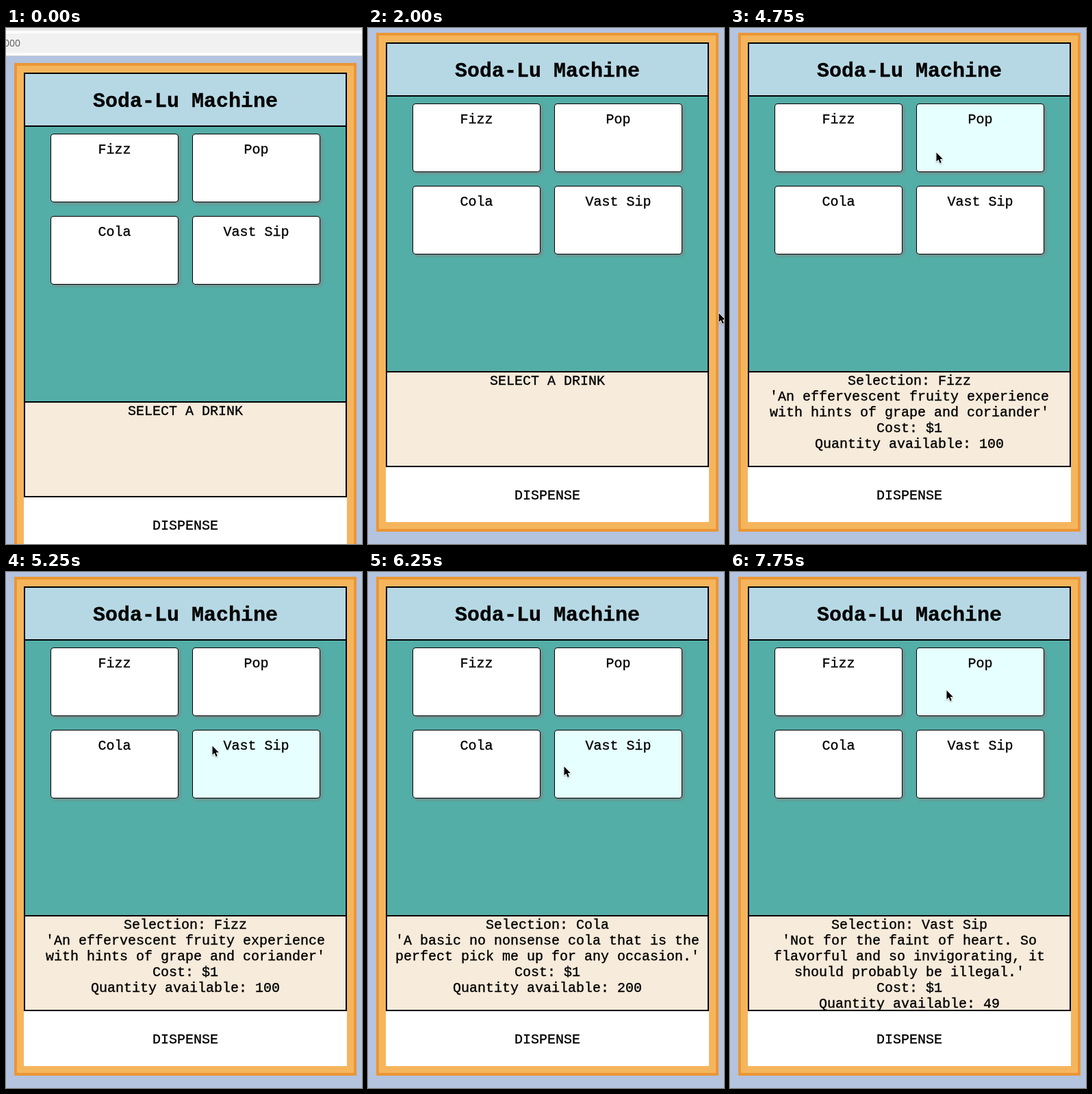
Animation, 520 px wide and 752 px high, one loop 8 s. Source, as an HTML page with a canvas:

```html
<!DOCTYPE html>
<html lang="en">
<head>
<meta charset="utf-8">
<title>Drink machine</title>
<style>
  html, body { margin: 0; width: 100%; height: 100%; overflow: hidden; background: #b4c3de; }
  canvas { display: block; }
</style>
</head>
<body>
<canvas id="stage" width="520" height="752"></canvas>
<script>
const ctx = document.getElementById('stage').getContext('2d');
const LOOP = 8000, STEP = 250, SCROLL = 44;
const CARD_W = 187, CARD_H = 100, GAP = 20;
const LINE_CHARS = 38, LINE_H = 23;
const MONO = '"Liberation Mono", monospace';

const drinks = [
  { name: 'Fizz', stock: 100,
    blurb: 'An effervescent fruity experience with hints of grape and coriander' },
  { name: 'Pop' },
  { name: 'Cola', stock: 200,
    blurb: 'A basic no nonsense cola that is the perfect pick me up for any occasion.' },
  { name: 'Vast Sip', stock: 49,
    blurb: 'Not for the faint of heart. So flavorful and so invigorating, it should probably be illegal.' }
];
drinks.forEach((drink, i) => {
  drink.x = 65 + (i % 2) * (CARD_W + GAP);
  drink.y = 110 + (i >> 1) * (CARD_H + GAP);
});

const clicks = [
  { time: 3750, drink: drinks[0] },
  { time: 5750, drink: drinks[2] },
  { time: 7250, drink: drinks[3] }
];

// Pointer key points: time, x, y
const path = [
  [2000, 512, 415], [2500, 373, 316], [3000, 196, 205], [3250, 195, 205],
  [3500, 192, 198], [3750, 187, 191], [4000, 193, 191], [4250, 214, 195],
  [4500, 215, 195], [4750, 301, 181], [5250, 301, 253], [5500, 226, 278],
  [6000, 226, 278], [6250, 286, 283], [7000, 301, 285], [7500, 314, 177],
  [7750, 316, 172]
];

function pointerAt(t) {
  if (t < path[0][0]) return null;
  const next = path.findIndex(key => key[0] > t);
  if (next < 0) return path.at(-1).slice(1);
  const [t0, x0, y0] = path[next - 1];
  const [t1, x1, y1] = path[next];
  const k = (t - t0) / (t1 - t0);
  return [x0 + (x1 - x0) * k, y0 + (y1 - y0) * k];
}

// The lowest few pixels of a card do not react
const isOver = ({ x, y }, [px, py]) =>
  px >= x && px < x + CARD_W && py >= y && py < y + CARD_H - 6;

function wrap(str) {
  const lines = [''];
  for (const word of str.split(' ')) {
    const joined = (lines.at(-1) + ' ' + word).trim();
    if (joined.length > LINE_CHARS) lines.push(word);
    else lines[lines.length - 1] = joined;
  }
  return lines;
}

function messageAt(t) {
  const click = clicks.findLast(c => c.time <= t);
  if (!click) return ['SELECT A DRINK'];
  const { name, blurb, stock } = click.drink;
  return [`Selection: ${name}`, ...wrap(`'${blurb}'`), 'Cost: $1', `Quantity available: ${stock}`];
}

function box(color, x, y, w, h) {
  ctx.fillStyle = color;
  ctx.fillRect(x, y, w, h);
}

function roundBox(color, x, y, w, h, r) {
  ctx.fillStyle = color;
  ctx.beginPath();
  ctx.roundRect(x, y, w, h, r);
  ctx.fill();
}

function text(str, x, y, font = '20px ' + MONO) {
  ctx.font = font;
  ctx.textAlign = 'center';
  ctx.fillStyle = ctx.strokeStyle = '#000';
  ctx.lineWidth = 0.35;
  ctx.fillText(str, x, y);
  ctx.strokeText(str, x, y);
}

function drawCard({ name, x, y }, hovered) {
  ctx.save();
  ctx.shadowColor = 'rgba(128, 128, 128, .9)';
  ctx.shadowBlur = 4;
  ctx.shadowOffsetX = ctx.shadowOffsetY = 2;
  roundBox('#000', x, y, CARD_W, CARD_H, 5);
  ctx.restore();
  roundBox(hovered ? '#e6ffff' : '#fff', x + 1, y + 1, CARD_W - 2, CARD_H - 2, 4);
  text(name, x + CARD_W / 2, y + 29);
}

function drawMachine(lines, pointer) {
  box('#eb9634', 12, 7, 500, 727);
  box('#f5b55d', 16, 11, 492, 719);
  box('#000', 26, 21, 472, 619);
  box('#b6d8e4', 28, 23, 468, 75);
  box('#54aea8', 28, 100, 468, 400);
  box('#f7ebdb', 28, 502, 468, 136);
  box('#fff', 26, 640, 472, 80);
  text('Soda-Lu Machine', 262, 71, 'bold 30px ' + MONO);
  drinks.forEach(drink => drawCard(drink, pointer && isOver(drink, pointer)));
  lines.forEach((line, i) => text(line, 262, 520 + i * LINE_H));
  text('DISPENSE', 262, 687);
}

function drawBrowserBar() {
  box('#fcfcfc', 0, 0, 520, 40);
  box('#e6e6e6', 0, 0, 520, 4);
  box('#f1f1f1', 0, 8, 520, 28);
  box('#d4d6da', 0, 40, 520, 1);
  ctx.font = '14px "Open Sans", sans-serif';
  ctx.textAlign = 'right';
  ctx.fillStyle = '#5c5c5c';
  ctx.fillText('000', 21, 27);
}

const arrow = new Path2D('M0 0V13L3 10.3L5.2 15.5L7.3 14.6L5.2 9.6H9.3Z');

function drawPointer([x, y]) {
  ctx.save();
  ctx.translate(Math.round(x) + 0.5, Math.round(y) + 0.5);
  ctx.shadowColor = 'rgba(0, 0, 0, .3)';
  ctx.shadowBlur = 2;
  ctx.shadowOffsetY = 1;
  ctx.strokeStyle = '#fff';
  ctx.lineWidth = 1.8;
  ctx.lineJoin = 'round';
  ctx.stroke(arrow);
  ctx.shadowColor = 'transparent';
  ctx.fillStyle = '#000';
  ctx.fill(arrow);
  ctx.restore();
}

function draw(t) {
  const scrolled = t >= STEP;
  const pointer = pointerAt(t);
  box('#b4c3de', 0, 0, 520, 752);
  ctx.save();
  if (!scrolled) ctx.translate(0, SCROLL);
  drawMachine(messageAt(t), pointer);
  ctx.restore();
  if (!scrolled) drawBrowserBar();
  if (pointer) drawPointer(pointer);
}

// The picture advances in steps of a quarter second
function tick() {
  const t = performance.now() % LOOP;
  draw(Math.floor(t / STEP) * STEP);
  requestAnimationFrame(tick);
}
tick();
</script>
</body>
</html>
```
